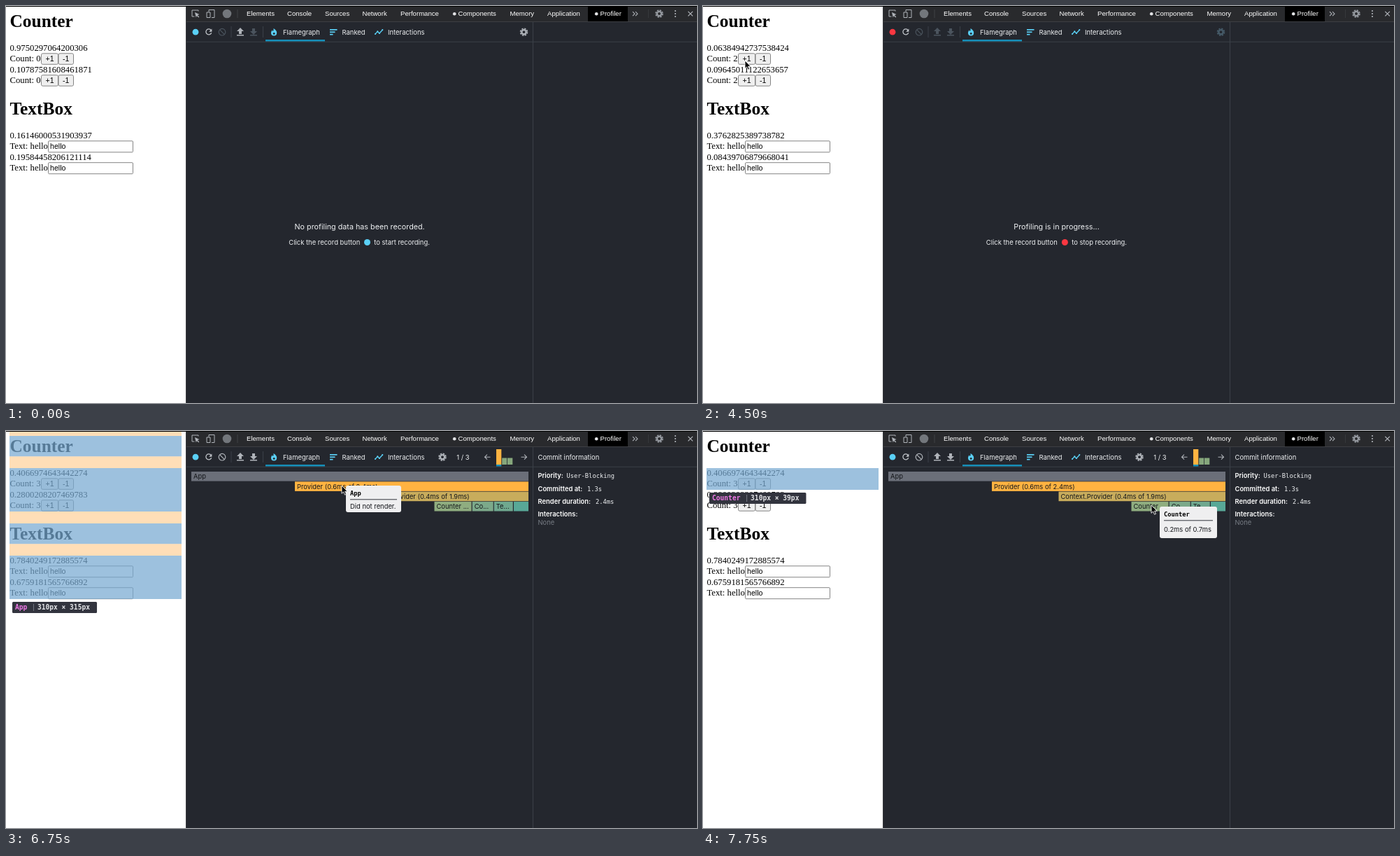
Write an HTML page that moves like this. It is 988 px wide and 567 px high and loops after 8000 ms.

```html
<!DOCTYPE html>
<html lang="en">
<head>
<meta charset="utf-8">
<title>Profiler</title>
<style>
  html, body { margin: 0; width: 100%; height: 100%; overflow: hidden; background: #fff; }
  svg { display: block; width: 988px; height: 567px; }
  text { white-space: pre; }
  .page { font: 12.7px "Liberation Serif", serif; fill: #000; }
  .h1 { font: bold 25.4px "Liberation Serif", serif; fill: #000; }
  .field { font: 10.6px "Liberation Sans", sans-serif; fill: #000; }
  .tab { font: 9.6px "Liberation Sans", sans-serif; fill: #fff; }
  .ui { font: 9.45px Inter, sans-serif; fill: #eef0f2; }
  .big { font: 10.75px Inter, sans-serif; fill: #eef0f2; }
  .label { font: 600 9.4px Inter, sans-serif; fill: #fff; }
  .dim { font: 9.45px Inter, sans-serif; fill: #777c84; }
  .bar { font: 9.4px Inter, sans-serif; fill: #14161a; }
  .mono { font: 8.75px "DejaVu Sans Mono", monospace; fill: #eef0f2; }
  .tipTitle { font: bold 8.75px "DejaVu Sans Mono", monospace; fill: #000; }
  .badge { font: bold 9.6px "DejaVu Sans Mono", monospace; fill: #e4e5e8; }
  .badgeName { font: bold 9.6px "DejaVu Sans Mono", monospace; fill: #ee78e6; }
</style>
</head>
<body>
<svg id="stage" viewBox="0 0 988 567"></svg>
<script>
const STEP = 250, LOOP = 8000;
const BLUE = '#5ad0f6', HOVER = '#94e1f7', RED = '#fa3741';
const ICON = '#afb3b9', DISABLED = '#4b545e', ACCENT = '#178fb9', LINE = '#3b4048';

// Random values printed by the four components, per count.
const renders = [
  ['0.9750297064200306', '0.10787581608461871', '0.16146000531903937', '0.19584458206121114'],
  ['0.5318460927315084', '0.72406918350274615', '0.43907261850394721', '0.61283907415026394'],
  ['0.06384942737538424', '0.09645011122653657', '0.3762825389738782', '0.08439706879668041'],
  ['0.4066974643442274', '0.2800208207469783', '0.7840249172885574', '0.6759181565766892']
];

// Pointer keys: step, x, y. Positions hold until the next key.
const pointer = [
  [1, 158, 157], [2, 340, 120], [3, 529, 105], [4, 470, 65], [5, 388, 51], [6, 310, 50], [7, 268, 45],
  [11, 106, 76], [12, 80, 80], [13, 60, 78], [20, 110, 84], [21, 200, 75], [22, 281, 56],
  [23, 268, 45], [26, 327, 79], [27, 480, 78], [28, 690, 52], [29, 752, 44], [30, 655, 105], [31, 641, 106]
];

const text = (cls, x, y, s) => `<text class="${cls}" x="${x}" y="${y}">${s}</text>`;
const rect = (x, y, w, h, fill, more = '') =>
  `<rect x="${x}" y="${y}" width="${w}" height="${h}" fill="${fill}" ${more}/>`;
const dot = (x, y, r, fill) => `<circle cx="${x}" cy="${y}" r="${r}" fill="${fill}"/>`;
const shape = (d, fill) => `<path d="${d}" fill="${fill}"/>`;
const stroke = (d, color, width = 1.2) =>
  `<path d="${d}" fill="none" stroke="${color}" stroke-width="${width}"/>`;

const gear = (x, y, color) => `<g fill="none" stroke="${color}" transform="translate(${x} ${y})">
  <circle r="3.1" stroke-width="2.4"/><circle r="4.9" stroke-width="1.7" stroke-dasharray="2.4 1.45"/></g>`;

const arrow = (x, y, dir, color) =>
  stroke(`M${x - 4 * dir} ${y}h${8 * dir}m${-3.5 * dir} -3.5l${3.5 * dir} 3.5l${-3.5 * dir} 3.5`, color, 1.1);

const fileArrow = (x, dir, color) =>
  shape(`M${x} ${36 - 5 * dir}l5 ${5 * dir}h-3v${4 * dir}h-4v${-4 * dir}h-3z`, color) +
  rect(x - 5, 41, 10, 1.5, color);

function button(x, y, w, label) {
  return rect(x, y, w, 15.5, '#efefef', 'rx="2" stroke="#767676" stroke-width=".9"') +
    text('field', x + w / 2 - (label === '+1' ? 6 : 4.7), y + 11.5, label);
}

function input(y) {
  return rect(60.5, y, 121, 16, '#fff', 'rx="1.2" stroke="#767676" stroke-width=".9"') +
    text('field', 63, y + 11.5, 'hello');
}

function page(count) {
  const values = renders[count];
  let out = rect(0, 0, 258, 567, '#fff') + text('h1', 5.5, 30, 'Counter') + text('h1', 5.5, 155, 'TextBox');
  for (const i of [0, 1]) {
    const dy = i * 30.9;
    out += text('page', 5.5, 64 + dy, values[i]) + text('page', 5.5, 79.4 + dy, 'Count: ' + count) +
      button(50.5, 67.8 + dy, 24, '+1') + button(75, 67.8 + dy, 21.5, '-1') +
      text('page', 5.5, 189 + dy, values[i + 2]) + text('page', 5.5, 204.4 + dy, 'Text: hello') +
      input(192.8 + dy);
  }
  return out;
}

function devtoolsTabs() {
  const tabs = [['Elements', 344], ['Console', 402], ['Sources', 456], ['Network', 509.5],
    ['Performance', 564], ['Components', 646.5], ['Memory', 720.5], ['Application', 774], ['Profiler', 849.5]];
  return rect(258, 1, 730, 21, '#292a2d') + rect(832, 1, 57, 21, '#000') + rect(258, 22, 730, 1, '#3d3f43') +
    stroke('M275 7.5v-1.5h-9v9h3.5', ICON, 1) + shape('M270 9l6.5 3-2.6.9 2.4 2.5-1 1-2.5-2.5-1 2.5z', ICON) +
    stroke('M290 8.5v-3h8v11h-4M287 9h5v7.5h-5z', ICON, 1) +
    dot(316, 11, 6.3, '#73777c') + rect(330.5, 5, 1, 12, '#414347') +
    dot(641.2, 11.2, 2.3, '#e3e4e6') + dot(844.2, 11.2, 2.3, '#e3e4e6') +
    tabs.map(([name, x]) => text('tab', x, 14, name)).join('') +
    stroke('M896 8.2l3 3-3 3M900 8.2l3 3-3 3', ICON, 1.1) + rect(918, 5, 1, 12, '#36383b') +
    gear(934, 11, '#94989e') + [7, 11, 15].map(y => dot(957, y, 1.1, ICON)).join('') +
    stroke('M975.3 7.8l6.6 6.6m0-6.6l-6.6 6.6', ICON, 1.2);
}

function toolbar(recording, loaded, recordColor) {
  const clear = loaded ? ICON : DISABLED;
  const divider = x => rect(x, 29, 1, 16, LINE);
  return dot(271, 37.2, 4.4, recordColor) +
    stroke('M293.2 34.6a4 4 0 1 0 .5 3.6', '#c0c4c9', 1.3) + shape('M294.4 32.6v4.2h-4.2z', '#c0c4c9') +
    `<circle cx="309" cy="37.2" r="4.8" fill="none" stroke="${clear}" stroke-width="1.2"/>` +
    stroke('M305.6 33.8l6.8 6.8', clear) + divider(321.5) +
    fileArrow(335, 1, recording ? DISABLED : ICON) + fileArrow(354, -1, clear) + divider(367) +
    shape('M382.4 32c3 1.6 5 4 4.8 6.4a4.1 4.1 0 0 1-8.2 0c0-1.8.8-3 1.8-4l.8 1.8c1-1 1.2-2.4.8-4.2z', BLUE) +
    dot(383.2, 39.4, 1.4, '#24272e') + text('ui', 396, 40.5, 'Flamegraph') + rect(371, 48, 85, 2.5, ACCENT) +
    rect(463, 33, 10.5, 1.7, BLUE) + rect(463, 36.4, 7.5, 1.7, BLUE) + rect(463, 39.8, 4.5, 1.7, BLUE) +
    text('ui', 480.5, 40.5, 'Ranked') +
    stroke('M528 40l3.3-3.6 2.6 2.6 4.6-5', BLUE, 1.4) +
    [[528, 40], [531.3, 36.4], [533.9, 39], [538.3, 34]].map(([x, y]) => dot(x, y, 1.1, BLUE)).join('') +
    text('ui', 546, 40.5, 'Interactions') +
    gear(loaded ? 624 : 740.5, 37.2, recording ? '#465b69' : ICON);
}

function message(recording) {
  const [title, titleX, x, dotX, tail] = recording
    ? ['Profiling is in progress...', 444.3, 404.8, 517.4, 'to stop recording.']
    : ['No profiling data has been recorded.', 412.5, 404.3, 516.5, 'to start recording.'];
  return text('big', titleX, 319, title) + text('ui', x, 341, 'Click the record button') +
    dot(dotX, 337.5, 4.5, recording ? RED : BLUE) + text('ui', dotX + 9.8, 341, tail);
}

function profile() {
  const bars = [[265, 0, 482, '#6b6f79', 'App'], [413, 1, 334, '#ffb341', 'Provider (0.6ms of 2.4ms)'],
    [508.5, 2, 238.5, '#c8ac5c', 'Context.Provider (0.4ms of 1.9ms)'], [612.5, 3, 53, '#8fad80', 'Counter ...'],
    [666.7, 3, 30, '#7ca98a', 'Co...'], [697.8, 3, 27, '#6fa88f', 'Te...'], [726, 3, 21, '#58a897', '']];
  const facts = [['Priority:', 67.3, 801.5, 'User-Blocking'], ['Committed at:', 85.5, 831, '1.3s'],
    ['Render duration:', 103.7, 843, '2.4ms'], ['Interactions:', 122, 0, '']];
  return bars.map(([x, row, w, fill, label]) =>
      rect(x, 58 + row * 14.3, w, 13.6, fill) + text('bar', x + 3, 68.2 + row * 14.3, label)).join('') +
    text('ui', 644.3, 40.5, '1 / 3') + arrow(688.5, 37.2, -1, ICON) + arrow(740.5, 37.2, 1, ICON) +
    rect(701, 26, 7.3, 22, '#ffb341') + rect(709.2, 38.5, 7, 9.5, '#86a77c') + rect(717, 38.5, 7.3, 9.5, '#86a77c') +
    rect(701, 48, 7.3, 2.5, ACCENT) + text('ui', 760.5, 40.5, 'Commit information') +
    facts.map(([label, y, x, value]) => text('label', 760.5, y, label) + text('mono', x, y, value)).join('') +
    text('dim', 760.5, 134, 'None');
}

function badge(y, name, size) {
  const split = 16 + name.length * 5.8 + 7.5;
  return rect(9, y, split + 6 + size.length * 5.78 - 1, 16, '#32343e', 'rx="1.5"') +
    text('badgeName', 13, y + 11.4, name) + rect(split - 2, y + 3, 1, 10, '#757882') +
    text('badge', split + 4, y + 11.4, size);
}

function tooltip(x, y, w, h, title, body) {
  return rect(x, y, w, h, '#efeff0', 'rx="3"') + text('tipTitle', x + 6, y + 14.2, title) +
    rect(x + 6, y + 19.3, w - 12, 1, '#33363c') +
    `<text class="bar" x="${x + 6}" y="${y + h - (h > 40 ? 8.7 : 5.5)}">${body}</text>`;
}

function hoverApp(x, y) {
  const band = ([top, bottom], fill) => rect(5, top, 246, bottom - top, fill);
  return [[7, 36.3], [53, 115], [132, 161.3], [178, 240]].map(b => band(b, 'rgba(120,170,210,.72)')).join('') +
    [[1, 7], [36.3, 53], [115, 132], [161.3, 178]].map(b => band(b, 'rgba(255,165,60,.37)')).join('') +
    badge(244, 'App', '310px × 315px') + tooltip(x + 6, y, 79, 38, 'App', 'Did not render.');
}

function hoverCounter(x, y) {
  return rect(5, 53, 246, 31, 'rgba(120,170,210,.72)') + badge(88, 'Counter', '310px × 39px') +
    tooltip(x + 12, y + 2, 82, 45, 'Counter', '0.2ms of 0.7ms');
}

const cursor = (x, y) => `<path transform="translate(${x} ${y})" d="M0 0v11.3l2.6-2.4 1.9 4.3 2-.9-1.9-4.1h3.6z"
  fill="#000" stroke="#fff" stroke-width=".9"/>`;

function scene(step) {
  const recording = step >= 9 && step < 25, loaded = step >= 25;
  const count = [14, 16, 19].filter(s => step >= s).length;
  const hovered = step === 7 || step === 8 || step === 24 || step === 25;
  const recordColor = hovered ? HOVER : recording ? RED : BLUE;
  const key = pointer.filter(([s]) => s <= step).pop();
  let out = page(count) + rect(258, 0, 730, 567, '#24272e') + rect(257, 0, 1, 567, '#3a3c40') +
    rect(258, 50.7, 730, 1, LINE) + rect(753, 23, 1, 544, LINE) +
    rect(0, 0, 988, 1, '#000') + devtoolsTabs() + toolbar(recording, loaded, recordColor) +
    (loaded ? profile() : message(recording));
  if (key) {
    const [, x, y] = key;
    if (step === 26 || step === 27) out += hoverApp(x, y);
    if (step >= 30) out += hoverCounter(x, y);
    out += cursor(x, y);
  }
  return out;
}

const stage = document.getElementById('stage');
let shown = -1;
function tick() {
  const step = Math.floor(performance.now() % LOOP / STEP);
  if (step !== shown) stage.innerHTML = scene(shown = step);
  requestAnimationFrame(tick);
}
tick();
</script>
</body>
</html>
```
